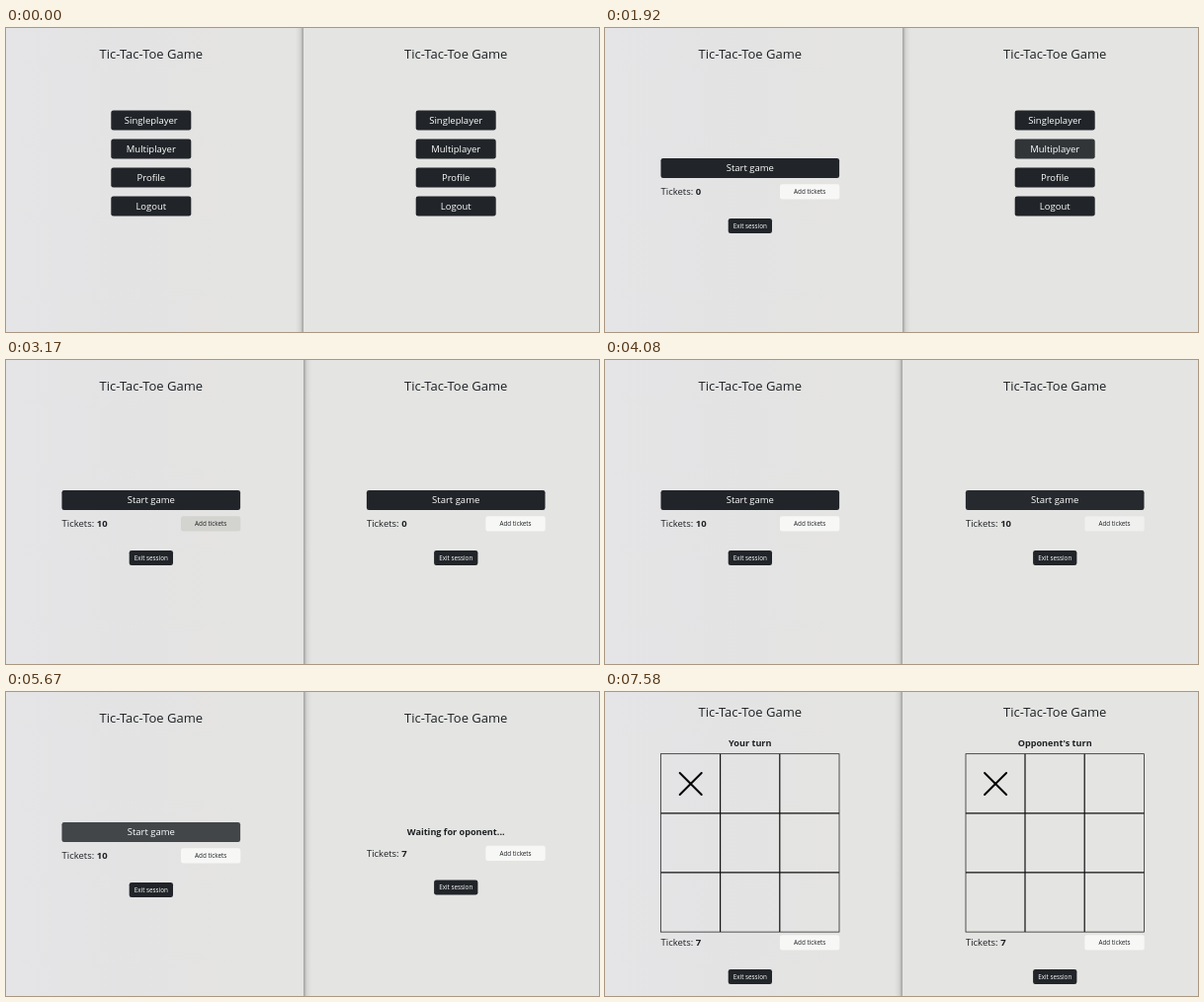
Animation, 600 px wide and 308 px high, one loop 8000 ms. Source, as an HTML page:

```html
<!DOCTYPE html>
<html lang="en">
<head>
<meta charset="utf-8">
<title>Tic-Tac-Toe Game</title>
<style>
  html, body { margin: 0; width: 100%; height: 100%; overflow: hidden; background: #e4e4e2; }
  svg { display: block; width: 600px; height: 308px; }
  text { font-family: "Open Sans", "Noto Sans", sans-serif; font-size: 9.5px; fill: #1d2124; }
  .mid { text-anchor: middle; }
  .title { font-size: 13px; font-weight: 500; }
  .msg { font-size: 9.1px; font-weight: 700; }
  .small { font-size: 6.3px; }
  .light { fill: #fff; }
  .count { font-weight: 700; }
</style>
</head>
<body>
<svg id="stage" viewBox="0 0 600 308">
  <defs>
    <linearGradient id="bg">
      <stop offset="0" stop-color="#e5e4e6"/>
      <stop offset=".2" stop-color="#e4e3e4"/>
      <stop offset=".4" stop-color="#e4e4e2"/>
      <stop offset="1" stop-color="#e4e4e2"/>
    </linearGradient>
    <linearGradient id="shadeL">
      <stop offset="0" stop-color="#000" stop-opacity="0"/>
      <stop offset=".6" stop-color="#000" stop-opacity=".07"/>
      <stop offset="1" stop-color="#000" stop-opacity=".3"/>
    </linearGradient>
    <linearGradient id="shadeR">
      <stop offset="0" stop-color="#000" stop-opacity=".3"/>
      <stop offset=".4" stop-color="#000" stop-opacity=".07"/>
      <stop offset="1" stop-color="#000" stop-opacity="0"/>
    </linearGradient>
  </defs>
  <rect width="600" height="308" fill="url(#bg)"/>
  <rect id="rightFocus" x="293" width="8" height="308" fill="url(#shadeL)"/>
  <rect id="leftFocus" x="301" width="8" height="308" fill="url(#shadeR)"/>
</svg>
<script>
const LOOP = 8000, STEP = 1000 / 12, CX = 146.8;
const DARK = [[33, 37, 41], [66, 70, 73]];
const LIGHT = [[247, 247, 246], [211, 211, 207]];
const stage = document.getElementById('stage');
const byId = id => document.getElementById(id);

function add(parent, tag, attrs = {}, text) {
  const el = document.createElementNS('http://www.w3.org/2000/svg', tag);
  for (const k in attrs) el.setAttribute(k, attrs[k]);
  if (text) el.textContent = text;
  return parent.appendChild(el);
}

function button(parent, x, y, w, h, label, cls, tones) {
  const g = add(parent, 'g');
  const rect = add(g, 'rect', { x, y, width: w, height: h, rx: 2.3 });
  const drop = cls.includes('small') ? 2.3 : 3.4;
  add(g, 'text', { x: x + w / 2, y: y + h / 2 + drop, class: 'mid ' + cls }, label);
  const hover = k => {
    const c = tones[0].map((v, i) => Math.round(v + (tones[1][i] - v) * k));
    rect.setAttribute('fill', `rgb(${c})`);
  };
  hover(0);
  return { g, hover };
}

function makePanel(dx) {
  const root = add(stage, 'g', { transform: `translate(${dx} 0)` });
  const title = add(root, 'text', { x: CX, class: 'mid title' }, 'Tic-Tac-Toe Game');

  const menu = add(root, 'g');
  const items = ['Singleplayer', 'Multiplayer', 'Profile', 'Logout'].map((label, i) =>
    button(menu, 106.3, 83.5 + 29 * i, 81, 20, label, 'light', DARK));

  const session = add(root, 'g');
  const start = button(session, 56.5, 132, 180.6, 20, 'Start game', 'light', DARK);
  const msg = add(session, 'text', { x: CX, class: 'mid msg' });

  const board = add(session, 'g', { fill: 'none', stroke: '#111' });
  add(board, 'rect', { x: 56.6, y: 62.7, width: 180.4, height: 180.4, 'stroke-width': .7 });
  add(board, 'path', { d: 'M116.6 62.7v180.4M176.8 62.7v180.4M56.6 122.8h180.4M56.6 182.9h180.4', 'stroke-width': 1.2 });
  const cross = add(session, 'path', {
    d: 'M75.7 82l22 22m0-22l-22 22', stroke: '#000', 'stroke-width': 2, 'stroke-linecap': 'round'
  });

  const foot = add(session, 'g');
  add(foot, 'text', { x: 56.5, y: 169.3 }, 'Tickets:');
  const count = add(foot, 'text', { x: 91.8, y: 169.3, class: 'count' });
  const more = button(foot, 177, 158.3, 60.3, 15.2, 'Add tickets', 'small', LIGHT);
  button(foot, 124.7, 193, 44.3, 15, 'Exit session', 'small light', DARK);

  return s => {
    title.setAttribute('y', s.playing ? 24.7 : 30.7);
    menu.setAttribute('opacity', s.menu);
    items[1].hover(s.multi);
    session.setAttribute('opacity', s.session);
    start.g.setAttribute('opacity', s.start);
    start.hover(s.startHover);
    msg.textContent = s.msg;
    msg.setAttribute('y', s.playing ? 54.6 : 145.1);
    msg.setAttribute('opacity', s.msgOn);
    board.setAttribute('opacity', s.board);
    cross.setAttribute('opacity', s.cross);
    foot.setAttribute('transform', `translate(0 ${s.playing ? 88 : s.waiting ? -2.5 : 0})`);
    count.textContent = s.count;
    more.hover(s.moreHover);
  };
}

const left = makePanel(0), right = makePanel(308.4);

function draw(t) {
  const ramp = (from, to) => Math.min(1, Math.max(0, (t - from) / (to - from)));
  const fade = (from, to) => 1 - ramp(from, to);
  const moved = t >= 7410;
  const cross = ramp(7260, 7575);
  const turn = ramp(7330, 7575);

  const leftFocus = (t >= 830 && t < 2080) || (t >= 3000 && t < 3825) || (t >= 5660 && t < 7330);
  byId('leftFocus').setAttribute('opacity', +leftFocus);
  byId('rightFocus').setAttribute('opacity', +!leftFocus);

  const leftIn = ramp(5985, 6250);
  left({
    playing: t >= 5915,
    menu: fade(900, 1150),
    multi: ramp(640, 790),
    session: ramp(1160, 1415),
    start: fade(5670, 5910),
    startHover: ramp(5050, 5200),
    msg: moved ? 'Your turn' : "Opponent's turn",
    msgOn: moved ? turn : leftIn,
    board: leftIn,
    cross,
    count: t < 3080 ? 0 : t < 5830 ? 10 : 7,
    moreHover: ramp(2720, 2870) * fade(3290, 3415)
  });

  const playing = t >= 5745;
  right({
    playing,
    waiting: t >= 4495,
    menu: fade(2150, 2400),
    multi: ramp(1845, 1995),
    session: ramp(2410, 2665),
    start: fade(4250, 4500),
    startHover: ramp(4060, 4200),
    msg: moved ? "Opponent's turn" : playing ? 'Your turn' : 'Waiting for oponent...',
    msgOn: moved ? turn : playing ? ramp(5700, 5995) : ramp(4590, 4830),
    board: ramp(5700, 5995),
    cross,
    count: t < 3825 ? 0 : t < 4330 ? 10 : 7,
    moreHover: ramp(3540, 3665) * fade(3970, 4110)
  });
}

const begin = performance.now();
function tick() {
  const t = (performance.now() - begin) % LOOP;
  draw(Math.floor((t + 5) / STEP) * STEP);
  requestAnimationFrame(tick);
}
tick();
</script>
</body>
</html>
```
